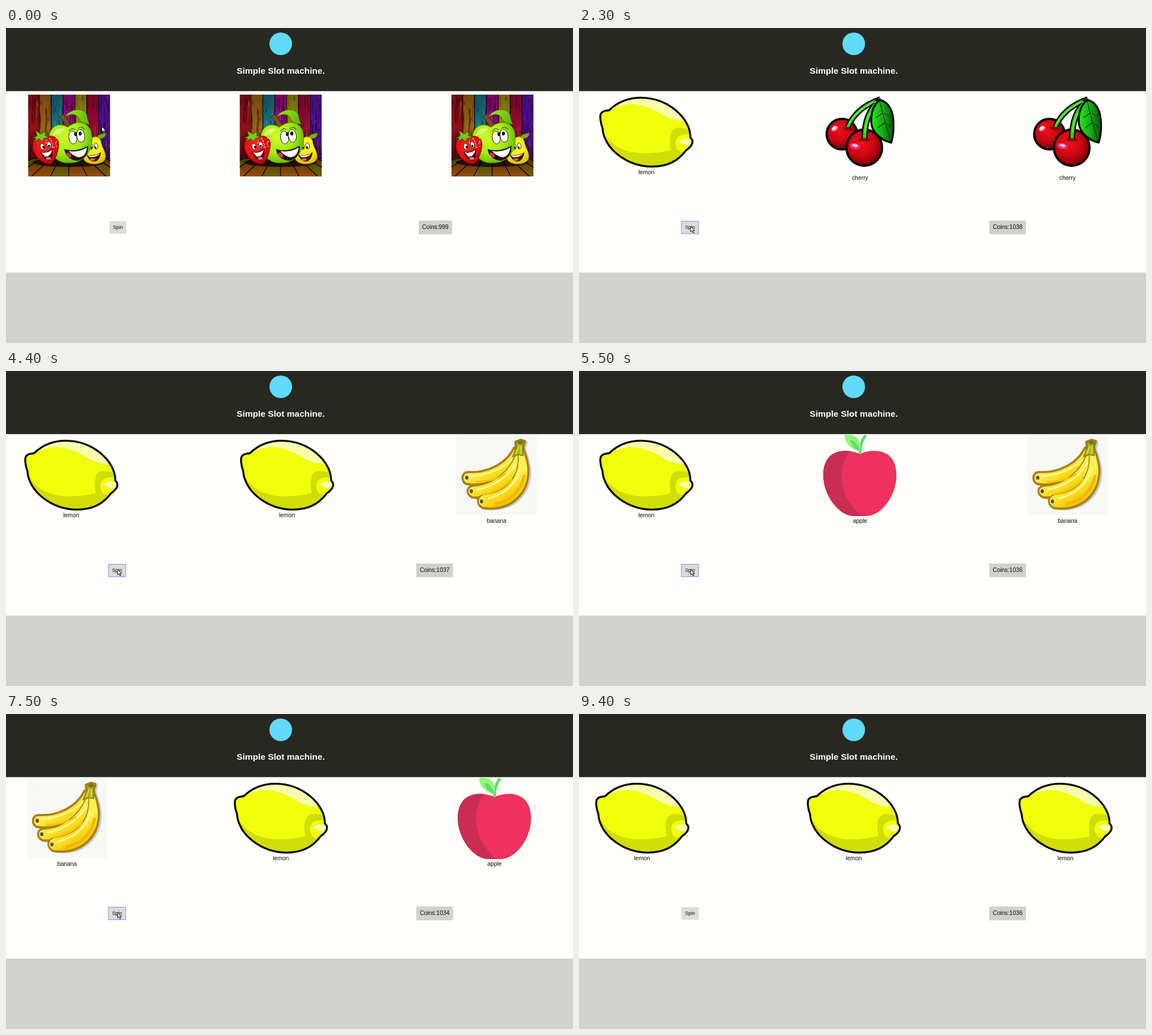
An HTML page with a canvas that plays this animation: 1003 by 558 pixels, repeating every 9500 ms.

```html
<!DOCTYPE html>
<html lang="en">
<head>
<meta charset="utf-8">
<title>Simple Slot machine</title>
<style>
html, body { margin: 0; width: 100%; height: 100%; overflow: hidden; background: #fffffb; }
canvas { display: block; width: 1003px; height: 558px; }
</style>
</head>
<body>
<canvas id="stage" width="1003" height="558"></canvas>
<script>
const ctx = document.getElementById('stage').getContext('2d');
const LOOP = 9500, STEP = 100;
const FONT = '"Liberation Sans", Arial, sans-serif';

// Each spin: start time, reels, coins
const SPINS = [
  [0, null, 999],
  [1900, ['lemon', 'cherry', 'cherry'], 1038],
  [3200, ['lemon', 'lemon', 'banana'], 1037],
  [4500, ['lemon', 'apple', 'banana'], 1036],
  [5700, ['lemon', 'banana', 'cherry'], 1035],
  [6900, ['banana', 'lemon', 'apple'], 1034],
  [8100, ['lemon', 'lemon', 'lemon'], 1036]
];
const BLUR_AT = 9400;

// Pointer keys: time, x, y
const POINTER = [
  [0, 169, 174], [200, 164, 190], [400, 161, 240], [600, 176, 320],
  [800, 196, 380], [1000, 204, 365], [1200, 205, 357], [1500, 203, 357],
  [1800, 197, 351], [9000, 197, 351], [9300, 69, 290]
];

function shape(d, fill, stroke, width = 1) {
  const p = new Path2D(d);
  if (fill) { ctx.fillStyle = fill; ctx.fill(p); }
  if (stroke) { ctx.strokeStyle = stroke; ctx.lineWidth = width; ctx.stroke(p); }
}

function oval(x, y, rx, ry, fill, stroke, width = 1, turn = 0) {
  ctx.beginPath();
  ctx.ellipse(x, y, rx, ry, turn, 0, Math.PI * 2);
  if (fill) { ctx.fillStyle = fill; ctx.fill(); }
  if (stroke) { ctx.strokeStyle = stroke; ctx.lineWidth = width; ctx.stroke(); }
}

function rect(x, y, w, h, fill) {
  ctx.fillStyle = fill;
  ctx.fillRect(x, y, w, h);
}

function text(s, x, y, size, color = '#100808', weight = '') {
  ctx.font = `${weight} ${size}px ${FONT}`;
  ctx.textAlign = 'center';
  ctx.fillStyle = color;
  ctx.fillText(s, x, y);
}

function paint(g, colors) {
  colors.forEach((c, i) => g.addColorStop(i / (colors.length - 1), c));
  return g;
}
const shade = (x0, y0, x1, y1, ...colors) => paint(ctx.createLinearGradient(x0, y0, x1, y1), colors);
const glow = (x, y, r, ...colors) => paint(ctx.createRadialGradient(x, y, 1, x, y, r), colors);

function random(seed) {
  return () => (seed = (seed * 16807) % 2147483647) / 2147483647;
}

function lemon() {
  const body = 'M46 145.500C62 130 80 123.500 102 123.500C150 123.500 190 160 189.500 194' +
    'C195.500 199 195 208 182 216.500C168 236 148 245.500 122 245.500C78 245.500 36 214 34 177' +
    'C31 169 29 158 31 152C35 146 40 147 46 145.500Z';
  ctx.save();
  ctx.clip(new Path2D(body));
  rect(28, 120, 168, 128, '#f2ff0a');
  shape('M44 147C74 129 104 132 134 150C153 162 168 167 192 163V120H44Z', '#f7ffac');
  shape('M32 178C44 204 66 221 106 222Q132 222 155 216.500C150 190 156 178 168 177' +
    'Q182 176 191 183V190C174 185 163 192 163 204Q164 216 172 219H188V250H32Z', '#d0dd07');
  shape('M169 201Q178 193 190 198L194 206Q182 211 169 201Z', '#f7ffac');
  ctx.restore();
  shape(body, null, '#0b0b06', 3.5);
}

function hatch(x, y, w, h) {
  ctx.save();
  ctx.beginPath();
  ctx.rect(x, y, w, h);
  ctx.clip();
  rect(x, y, w, h, '#fdfdfb');
  ctx.strokeStyle = '#f1f1ef';
  ctx.lineWidth = 1.5;
  ctx.beginPath();
  for (let i = -h; i < w; i += 5) {
    ctx.moveTo(x + i, y);
    ctx.lineTo(x + i + h, y + h);
  }
  ctx.stroke();
  ctx.restore();
}

function banana() {
  hatch(796.500, 112.500, 142.500, 143);
  const fruits = [
    'M899 137C885 166 850 182 818 180C806 180 806 195 814 199C852 205 892 185 907 148Z',
    'M903 142C893 178 860 202 826 204C814 206 816 219 825 223C868 226 906 195 913 148Z',
    'M906 148C908 190 885 214 845 219C832 222 834 238 844 242C896 248 924 214 923 174C922 160 918 148 914 138Z'
  ];
  const stem = 'M902 126L910 123L917 125L914 133L915 150L906 148L896 152L903 134Z';
  const all = fruits.concat(stem);
  ctx.save();
  ctx.translate(4, 2);
  all.forEach(d => shape(d, '#cbcbca', '#cbcbca', 4));
  ctx.restore();
  all.forEach(d => shape(d, null, '#a9801b', 6));
  fruits.forEach((d, i) => {
    const y = 180 + i * 21;
    shape(d, shade(850, y - 12, 872, y + 28, '#fff052', '#f8d816', '#eab800'), '#a9801b', 1.8);
  });
  shape('M822 186Q865 184 895 157M833 210Q876 203 904 162M852 226Q897 215 910 173', null, '#fff69a', 3);
  shape('M830 196Q864 196 884 182M842 219Q875 214 896 191', null, '#f3c400', 3);
  shape('M864 236Q908 227 917 184', null, '#f4b600', 5);
  shape(stem, '#a8b51c', '#8a741a', 1.5);
  shape('M907 133L902 147M911 133L910 147', null, '#dbe43a', 2);
  oval(910, 127, 5, 3, '#7d6d18');
  [[815, 189], [823, 213], [841, 231]].forEach(([x, y]) => {
    oval(x, y, 5, 6, '#f9e976');
    oval(x, y, 3, 3.5, '#69501a');
  });
}

function cherry() {
  const black = '#080404';
  const ball = (x, y, rx, ry) =>
    oval(x, y, rx, ry, glow(x - 5, y - 7, rx * 1.3, '#ee101d', '#cf0713', '#6e0004'), black, 4);
  const leaf = 'M899 127C880 143 880 174 892 187C901 197 910 201 919 203C924 190 925 163 920 148C915 134 907 130 899 127Z';
  ball(832, 188, 27, 27);
  shape('M842 176Q858 140 900 126', null, black, 10);
  shape('M842 176Q858 140 900 126', null, '#2bd322', 5);
  ball(871.500, 212, 31.500, 32);
  shape('M872 196Q872 150 899 128', null, black, 11);
  shape('M872 196Q872 150 899 128', null, '#2bd322', 6);
  shape('M844 170Q858 144 892 130M873 185Q875 153 894 136', null, '#70fa4d', 1.5);
  shape(leaf, shade(884, 165, 925, 165, '#27e520', '#18aa18', '#064e08'), black, 3.5);
  shape('M899 130Q907 164 918 200M905 150L892 159M909 167L895 177M907 151L917 157M911 170L920 176', null, '#093f09', 1.3);
  oval(841, 178, 9, 3, '#8d0007', null, 1, 0.2);
  oval(872, 198, 10, 3, '#8d0007');
  oval(819, 178, 6, 4, '#ff9bb8', null, 1, -0.6);
  oval(818, 177, 3.5, 2.2, '#fff', null, 1, -0.6);
  oval(855, 209, 9, 5, '#f5338d', null, 1, 0.2);
  oval(855, 208, 5, 2.4, '#ffd1e8', null, 1, 0.2);
}

function apple() {
  const body = 'M497 147C480 139 432 132 432 185C432 220 460 257 486 257H508' +
    'C535 257 561.500 220 561.500 185C561.500 132 513 139 497 147Z';
  ctx.save();
  ctx.clip(new Path2D(body));
  rect(430, 135, 134, 124, '#ef315d');
  shape('M483 140C460 160 459 199 476 228Q486 246 502 258H430V135Z', '#c92d53');
  ctx.restore();
  shape('M497 146C497 134 500 122 507 114', null, '#5fdd72', 5);
  shape('M469.500 113C489 111 500 120 497 142C481 139 471 129 469.500 113Z', '#94f678');
  shape('M479 122Q492 123 497 142Q484 138 479 122Z', '#5fdd72');
}

const FRUIT = { lemon: [lemon, 111.5, 166], banana: [banana, 867.7, 144], cherry: [cherry, 864, 144], apple: [apple, 497, 144] };

function eye(x, y, rx, ry, px, py, r) {
  oval(x, y, rx, ry, '#fff', '#16200a', 1, -0.15);
  oval(px, py, r, r * 1.3, '#080808');
}

function planks() {
  const rnd = random(7);
  ['#94101a', '#9c6512', '#157384', '#a3058c', '#9c8c0c', '#9a0a35', '#54129f'].forEach((c, i) => {
    const x = i * 21 - 2;
    rect(x, 0, 21, 116, c);
    for (let k = 0; k < 34; k++) {
      const dark = rnd() < 0.72;
      rect(x + rnd() * 20, rnd() * 112, 0.7 + rnd() * 1.6, 5 + rnd() * 24,
        dark ? 'rgba(25,3,18,.38)' : 'rgba(255,190,60,.2)');
    }
    rect(x, 0, 1.6, 116, '#1d060e');
  });
  rect(0, 0, 145, 116, shade(0, 0, 0, 116, 'rgba(15,0,10,.3)', 'rgba(0,0,0,0)', 'rgba(15,0,10,.6)'));

  rect(0, 113, 145, 32, shade(0, 113, 0, 145, '#2a1005', '#82500c'));
  for (let i = 0; i < 9; i++) {
    const a = 8 + i * 16, b = -60 + i * 33;
    shape(`M${a} 113H${a + 16}L${b + 33} 145H${b}Z`, i % 3 ? 'rgba(168,84,8,.4)' : 'rgba(98,113,8,.5)', '#180904', 1.4);
  }
  oval(72, 120, 64, 8, 'rgba(10,3,2,.75)');
}

function pear() {
  shape('M120 79Q122 69 138 68Q137 78 127 78Q123 78 122 82Z', '#78ad10', '#2e4d08', 0.7);
  shape('M109 85C110 72 126 71 129 83C130 94 138 101 137 111C136 126 103 127 98 114C96 104 107 98 109 85Z',
    glow(114, 92, 36, '#fffb38', '#f8ec06', '#cfa900'), '#7d6a07', 0.8);
  eye(111, 92, 3.2, 5.5, 112, 94, 1.6);
  eye(120, 91, 3.2, 5.5, 119, 94, 1.6);
  shape('M103 106Q117 110 129 102Q126 121 113 118Q106 115 103 106Z', '#45100b');
  shape('M105 107Q117 110 127 104Q121 112 109 111Z', '#fff');
  oval(114, 115, 4.5, 2, '#f36a59');
}

function greenApple() {
  shape('M67 62Q66 48 55 40L62 35Q73 46 77 61Z', '#79501a', '#392009', 1);
  shape('M65 40C76 22 101 24 104 37Q105 47 109 52C98 53 91 48 88 39C81 33 73 34 65 40Z',
    shade(72, 28, 103, 52, '#9be614', '#5eb80c'), '#2f7009', 0.8);
  shape('M70 58C86 43 113 47 113 76C114 100 98 122 74 121C49 123 35 103 37 79C37 53 57 49 70 58Z',
    glow(66, 74, 58, '#cdfb2a', '#a4ed10', '#4fa305'), '#3c7c06', 0.8);
  shape('M43 74Q46 56 65 61Q58 66 55 70Q49 69 43 74Z', '#e0fc7c');
  eye(79, 76, 7, 11.5, 84, 70, 2.6);
  eye(93, 73, 7, 11.5, 92, 69, 2.6);
  shape('M72 65Q77 58 83 62M88 60Q95 55 100 62', null, '#356c07', 1.3);
  shape('M64 97Q84 103 106 91Q107 112 88 117Q68 116 64 97Z', '#2b0a0c', '#244d05', 1);
  shape('M72 100Q88 103 104 94Q102 110 90 111Q79 109 72 100Z', '#fff');
  oval(72, 107, 5, 3.5, '#df315d', null, 1, 0.7);
}

function strawberry() {
  shape('M8 88C10 73 22 77 32 75C45 70 56 78 54 91C52 107 46 122 37 123C24 123 6 105 8 88Z',
    glow(28, 92, 38, '#ff2a26', '#e60c14', '#960207'), '#65070a', 0.8);
  const rnd = random(11);
  for (let i = 0; i < 24; i++) oval(32 + rnd() * 19, 77 + rnd() * 20, 0.8, 1.1, '#ffc7a8');
  shape('M8 77L16 73L13 64L23 70L30 65L30 73L37 75L27 78L25 83L19 78L11 83L14 77Z', '#7cc81c', '#24600a', 0.8);
  eye(25, 92, 3.6, 5.5, 27, 93, 1.8);
  eye(37, 89, 3.6, 5.5, 37, 91, 1.8);
  shape('M21 101Q33 104 43 95Q45 116 36 117Q25 114 21 101Z', '#42080b');
  shape('M23 102Q33 105 42 98Q40 110 30 110Z', '#fff');
  oval(36, 113, 4.5, 2.6, '#ff7180');
}

function poster(x) {
  ctx.save();
  ctx.translate(x, 118);
  ctx.beginPath();
  ctx.rect(0, 0, 145, 144.6);
  ctx.clip();
  planks();
  pear();
  greenApple();
  strawberry();
  ctx.restore();
}

function reels(names) {
  if (!names) {
    for (let i = 0; i < 3; i++) poster(39.2 + i * 374.4);
    return;
  }
  const total = names.reduce((sum, n) => sum + FRUIT[n][2], 0);
  const gap = (1123.2 - total) / 6;
  let x = -75.5;
  for (const name of names) {
    const [draw, home, width] = FRUIT[name];
    const mid = x + gap + width / 2;
    ctx.save();
    ctx.translate(mid - home, 0);
    draw();
    ctx.restore();
    text(name, mid, name === 'lemon' ? 259 : 268.5, 10.4);
    x += width + gap * 2;
  }
}

function pointer(t) {
  const i = POINTER.findIndex(k => k[0] > t);
  if (i < 0 && t > 9300) return;
  const b = POINTER[i < 0 ? POINTER.length - 1 : i];
  const a = i < 0 ? b : POINTER[i - 1];
  const f = a === b ? 0 : (t - a[0]) / (b[0] - a[0]);
  ctx.save();
  ctx.translate(a[1] + (b[1] - a[1]) * f, a[2] + (b[2] - a[2]) * f);
  shape('M.5 .5V10L2.800 8L4.500 12L6.200 11.200L4.600 7.500H7.500Z', '#fff', '#111', 1);
  ctx.restore();
}

function draw(t) {
  const [, names, coins] = SPINS.filter(s => s[0] <= t).pop();
  ctx.lineCap = 'butt';
  ctx.lineJoin = 'round';
  rect(0, 0, 1003, 558, '#fffffb');
  rect(0, 0, 1003, 111.8, '#272822');
  rect(0, 433.3, 1003, 125, '#d1d2cd');
  oval(486, 28, 20, 20, '#61dafb');
  text('Simple Slot machine.', 486, 80.5, 15.5, '#fff', 'bold');
  reels(names);

  const mid = names ? 196.4 : 198;
  const half = names ? 15.2 : 14.9;
  rect(mid - half, 342, half * 2, 22.3, '#dcdcd8');
  if (names && t < BLUR_AT) {
    ctx.strokeStyle = '#8ba4e4';
    ctx.lineWidth = 1.2;
    ctx.strokeRect(mid - half, 342.3, half * 2, 22);
  }
  text('Spin', mid, 355.7, 8.67);

  const cx = names ? 758.2 : 759.5;
  const cw = names ? 65 : 59;
  rect(cx - cw / 2, 341, cw, 24.5, '#d0d1cd');
  text('Coins:' + coins, cx, 355.7, 10.4);
  pointer(t);
}

function tick() {
  const t = performance.now() % LOOP;
  draw(Math.floor(t / STEP) * STEP);
  requestAnimationFrame(tick);
}
tick();
</script>
</body>
</html>
```
